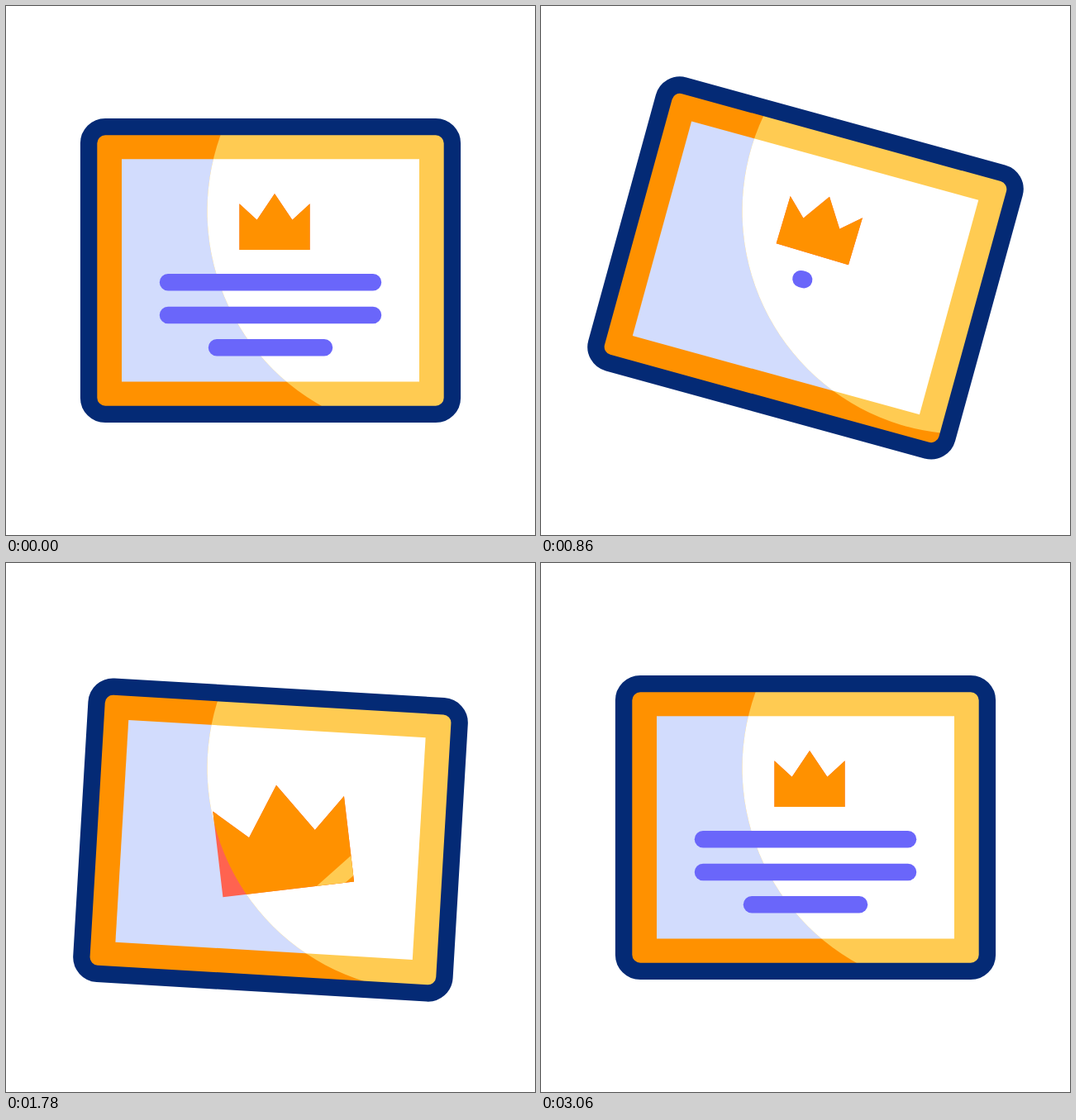
Animation, 640 px wide and 640 px high, one loop 3.3 s. Source, as an HTML page:

```html
<!DOCTYPE html>
<html lang="en">
<head>
<meta charset="utf-8">
<title>Certificate</title>
<style>
  html, body { margin: 0; width: 100%; height: 100%; overflow: hidden; background: #fff; }
  svg { display: block; width: 100vw; height: 100vh; }
</style>
</head>
<body>
<svg viewBox="0 0 640 640">
  <defs>
    <clipPath id="glow"><circle cx="513.8" cy="248" r="270.3"/></clipPath>
    <clipPath id="crownClip"><polygon class="crown"/></clipPath>
  </defs>

  <g class="card">
    <rect x="-220" y="-174" width="440" height="348" rx="20" fill="#ff9100"/>
    <rect x="-180" y="-134.7" width="360" height="269.2" fill="#d2dcfd"/>
  </g>
  <g clip-path="url(#glow)">
    <g class="card">
      <rect x="-220" y="-174" width="440" height="348" rx="20" fill="#ffcb52"/>
      <rect x="-180" y="-134.7" width="360" height="269.2" fill="#fff"/>
    </g>
  </g>
  <g class="card" fill="none">
    <rect x="-219.9" y="-173.9" width="439.8" height="347.8" rx="20" stroke="#042a75" stroke-width="20.4"/>
    <g stroke="#6a66fa" stroke-width="20.5" stroke-linecap="round">
      <path class="line"/><path class="line"/><path class="line"/>
    </g>
  </g>

  <polygon class="crown" fill="#ff6350"/>
  <g clip-path="url(#glow)"><polygon class="crown" fill="#ff9100"/></g>
  <g clip-path="url(#crownClip)">
    <g class="card"><rect id="shine" x="-10" y="-300" width="20" height="600" fill="#ffcb52"/></g>
  </g>
</svg>
<script>
const LOOP = 3300;
const LINES_END = 3060;

// Keys are [time, value] pairs, eased between neighbours.
const cardY = [[0, 0], [365, 54], [707, -34], [1070, 46], [1391, -13.5], [1705, 18], [2000, 0]];
const cardTilt = [[0, 0], [375, -18], [904, 16], [1361, -8], [1848, 4], [2165, 0]];
const crownGrow = [[740, 0], [1440, 1], [1860, 1], [2620, 0]];
const crownTilt = [[740, 0], [1370, 13], [1890, -13], [2630, 0]];

const lines = [
  { y: 14.2, length: 248, delay: 240 },
  { y: 54, length: 248, delay: 120 },
  { y: 93.3, length: 130, delay: 0 }
];

const all = selector => [...document.querySelectorAll(selector)];
const cards = all('.card');
const crowns = all('.crown');
const linePaths = all('.line');
const shine = document.getElementById('shine');

const smooth = u => u * u * (3 - 2 * u);

function track(keys, t) {
  if (t <= keys[0][0]) return keys[0][1];
  for (let i = 1; i < keys.length; i++) {
    const [t0, a] = keys[i - 1], [t1, b] = keys[i];
    if (t < t1) return a + (b - a) * smooth((t - t0) / (t1 - t0));
  }
  return keys[keys.length - 1][1];
}

// Stretch a little, then collapse to nothing.
function lineScale(t) {
  const peak = 1.185, stretch = 245, collapse = 378;
  if (t <= 0) return 1;
  if (t < stretch) return 1 + (peak - 1) * smooth(t / stretch);
  const u = Math.min(1, (t - stretch) / collapse);
  return peak * (1 - Math.pow(u, 2.48));
}

function render(t) {
  const card = `translate(320 ${320 + track(cardY, t)}) rotate(${track(cardTilt, t)})`;
  cards.forEach(el => el.setAttribute('transform', card));

  const grow = track(crownGrow, t);
  const crown = `${card} translate(5 ${-87 + 31.2 * grow}) rotate(${track(crownTilt, t)}) scale(${1 + 0.875 * grow})`;
  crowns.forEach(el => el.setAttribute('transform', crown));

  shine.setAttribute('transform', `rotate(45) translate(${(t - 1482) * 0.297} 0)`);

  // Lines leave bottom first and return in mirrored time.
  const clock = Math.min(t, LINES_END - t);
  lines.forEach(({ y, length, delay }, i) => {
    const half = length / 2 * lineScale(clock - delay);
    linePaths[i].setAttribute('d', half > 0.01 ? `M${-half} ${y}H${half}` : '');
  });
}

crowns.forEach(el => el.setAttribute('points',
  '-42.6,61.9 -42.6,6.2 -21.4,25.8 0,-5.9 21.4,25.8 42.6,6.2 42.6,61.9'));

const start = performance.now();
function tick() {
  render((performance.now() - start) % LOOP);
  requestAnimationFrame(tick);
}
render(0);
requestAnimationFrame(tick);
</script>
</body>
</html>
```
